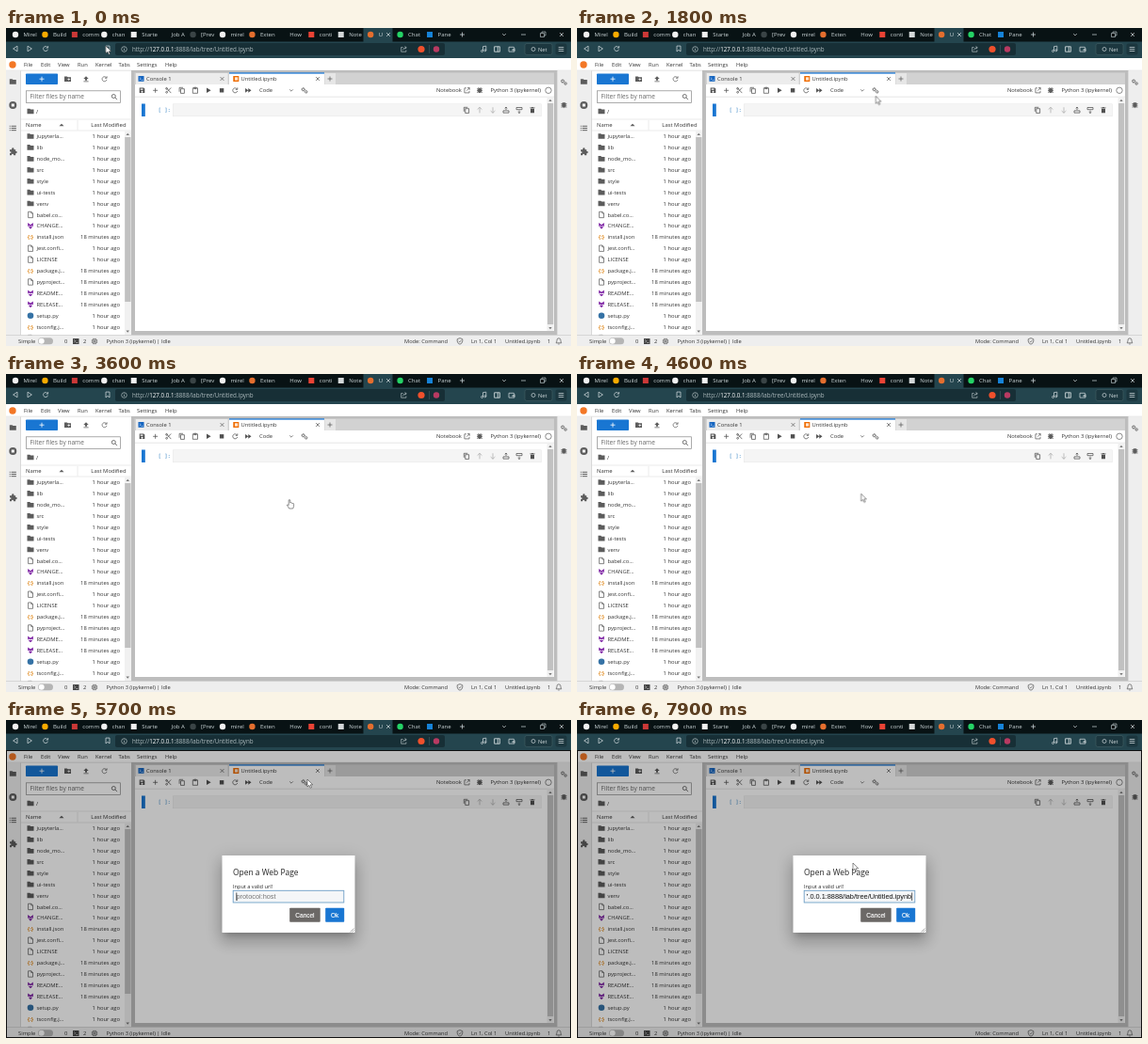
Write an HTML page that moves like this. It is 600x338 px and loops after 8 s.

```html
<!DOCTYPE html>
<html lang="en">
<head>
<meta charset="utf-8">
<title>Notebook workspace</title>
<style>
html, body { margin: 0; width: 100%; height: 100%; overflow: hidden; background: #fff; }
svg { display: block; width: 100vw; height: 100vh; }
text { font-family: "Open Sans", "Noto Sans", sans-serif; white-space: pre; }
text.field { font-family: "Liberation Sans", Arial, sans-serif; }
text.mono { font-family: "DejaVu Sans Mono", monospace; }

#pointer { animation: move 8s infinite; }
#arrow { animation: arrow 8s step-end infinite; }
#hand { animation: hand 8s step-end infinite; }
#hover { animation: hover 8s step-end infinite; }
#modal { animation: modal 8s step-end infinite; }
#empty { animation: empty 8s step-end infinite; }
#pasted { animation: pasted 8s step-end infinite; }
.caret { animation: blink 1s -.31s step-end infinite; }

@keyframes move {
  0%, 1.25% { transform: translate(106px, 19px); animation-timing-function: ease-in-out; }
  11.2%, 13% { transform: translate(289px, 76px); animation-timing-function: ease-in-out; }
  25%, 32.5% { transform: translate(320px, 72px); animation-timing-function: ease-in-out; }
  43%, 55% { transform: translate(300px, 133px); animation-timing-function: ease-in-out; }
  67.5%, 74% { transform: translate(320px, 63px); animation-timing-function: ease-in-out; }
  86%, 100% { transform: translate(293px, 152px); }
}
@keyframes arrow { 0% { opacity: 1; } 41.9% { opacity: 0; } 56% { opacity: 1; } }
@keyframes hand { 0% { opacity: 0; } 41.9% { opacity: 1; } 56% { opacity: 0; } }
@keyframes hover { 0% { opacity: 0; } 66% { opacity: 1; } 71.2% { opacity: 0; } }
@keyframes modal { 0% { opacity: 0; } 71.2% { opacity: 1; } }
@keyframes empty { 0% { opacity: 1; } 85% { opacity: 0; } }
@keyframes pasted { 0% { opacity: 0; } 85% { opacity: 1; } }
@keyframes blink { 0% { opacity: 1; } 50% { opacity: 0; } }
</style>
</head>
<body>
<svg viewBox="0 0 600 338" preserveAspectRatio="none">
  <defs>
    <clipPath id="fieldClip"><rect x="244" y="182" width="113.500" height="12"/></clipPath>
  </defs>
  <g id="browser"></g>
  <g id="page"></g>
  <g id="modal">
    <rect x=".5" y="32.500" width="599" height="305" fill="#000" fill-opacity=".26"/>
    <rect x=".5" y="32.500" width="599" height="305" fill="none" stroke="#101010"/>
    <g id="dialog"></g>
    <g id="empty">
      <text class="field" x="244.500" y="190.200" font-size="7.350" fill="#777">protocol:host</text>
      <path class="caret" d="M244.800 183.500V192" stroke="#111" stroke-width=".7"/>
    </g>
    <g id="pasted" clip-path="url(#fieldClip)">
      <text class="field" x="355.200" y="190.200" font-size="7.350" text-anchor="end" fill="#111">http://127.0.0.1:8888/lab/tree/Untitled.ipynb</text>
      <path class="caret" d="M355.700 183.500V192" stroke="#111" stroke-width=".7"/>
    </g>
    <path d="M365.500 225.500l4-4M367.500 225.500l2-2" stroke="#777" stroke-width=".6"/>
  </g>
  <g id="pointer">
    <path id="arrow" d="M0 0V8L1.900 6.300L3.200 9.200L4.500 8.600L3.200 5.800H5.700Z" fill="#fff" stroke="#333" stroke-width=".55"/>
    <path id="hand" d="M.2 1Q1-.2 1.800 1V4Q2.700 3.300 3.200 4.200Q4.100 3.600 4.500 4.500Q5.600 4.200 5.600 5.400V7.600Q5.200 9 4.700 10H.7Q-.3 8-1.700 6.400Q-1.300 5.300.2 6.500Z" fill="#fff" stroke="#333" stroke-width=".55"/>
  </g>
</svg>
<script>
const NS = 'http://www.w3.org/2000/svg';
const INK = '#333', GREY = '#5c5c5c', BLUE = '#1976d2';
let layer;

function add(tag, attrs) {
  const el = document.createElementNS(NS, tag);
  for (const key in attrs) el.setAttribute(key, attrs[key]);
  layer.append(el);
  return el;
}
const rect = (x, y, width, height, fill, more) => add('rect', { x, y, width, height, fill, ...more });
const dot = (cx, cy, r, fill, more) => add('circle', { cx, cy, r, fill, ...more });
// Text is placed by its vertical middle.
function label(x, mid, str, size = 5.8, fill = INK, more) {
  const el = add('text', { x, y: mid + size * .36, 'font-size': size, fill, ...more });
  el.textContent = str;
  return el;
}
const line = (d, stroke = GREY, width = .7) =>
  add('path', { d, fill: 'none', stroke, 'stroke-width': width });

// Icon shapes are centred on the origin: outline, 1 for solid, 2 for both.
const shapes = {
  folder: ['M-3.500-2.800H-.7L.2-1.900H3.500V2.800H-3.500Z', 1],
  newFolder: ['M-3.500-2.800H-.7L.2-1.900H3.500V2.800H-3.500ZM-.1.1V.7H1V1.800H1.600V.7H2.700V.1H1.600V-1H1V.1Z', 1],
  file: ['M-2.400-3.200H.8L2.500-1.500V3.200H-2.400ZM.8-3.200V-1.400H2.500'],
  markdown: ['M-2.800-3.300L0-1.200L2.800-3.300V.3H1.500V-.6L0 .6L-1.500-.6V.3H-2.800ZM-2.200 1H2.200L0 3.400Z', 1],
  upload: ['M0-3L2.700-.2H1V1.500H-1V-.2H-2.700ZM-2.600 2.200H2.600V3H-2.600Z', 1],
  refresh: ['M2.200-1.300A2.500 2.500 0 1 0 2.500.7M2.600-2.900V-.9H.6'],
  search: ['M1.300-.5A2 2 0 1 1-2.700-.5A2 2 0 1 1 1.300-.5M.8.9L3 3.100'],
  list: ['M-3.600-2.200h1M-1.700-2.200H3.600M-3.600 0h1M-1.700 0H3.600M-3.600 2.200h1M-1.700 2.200H3.600'],
  puzzle: ['M-3.300-2.200H-1.200Q-1.500-4.200 0-4.200T1.200-2.200H2.900V-.5Q4.500-.7 4.500.6T2.900 1.700V3.800H.9Q.8 2.200-.3 2.200T-1.500 3.800H-3.300V1.700Q-1.700 1.500-1.700.6T-3.300-.3Z', 1],
  save: ['M-2.800-2.800H1.700L2.800-1.700V2.800H-2.800ZM-1.800-1.900V-.6H1V-1.900ZM-1 1.400A1 1 0 1 0 1 1.400A1 1 0 1 0-1 1.400', 1],
  plus: ['M-2.500 0H2.500M0-2.500V2.500'],
  cut: ['M-2.500-2.800L2.600 2.800M2.500-2.800L-1.200 1.100M-1.200 2A.9.9 0 1 1-3 2A.9.9 0 1 1-1.200 2M-1.200-1.900A.9.9 0 1 1-3-1.900A.9.9 0 1 1-1.200-1.900'],
  copy: ['M-1.300-1.600H2.600V3.100H-1.300ZM-2.700 1.500V-3H1.300'],
  paste: ['M-2.600-2.500H2.600V3H-2.600ZM-1.200-3.100H1.200V-1.700H-1.200Z'],
  play: ['M-2-2.800L2.600 0L-2 2.800Z', 1],
  stop: ['M-2.200-2.200H2.200V2.200H-2.200Z', 1],
  forward: ['M-3.200-2.400L0 0L-3.200 2.400ZM0-2.400L3.200 0L0 2.400Z', 1],
  down: ['M-1.800-.9L0 .9L1.800-.9'],
  up: ['M0 3V-3M-2.400-.7L0-3L2.400-.7'],
  below: ['M0-3V3M-2.400.7L0 3L2.400.7'],
  close: ['M-1.900-1.900L1.900 1.900M1.900-1.900L-1.900 1.900'],
  link: ['M-.6-2.500H-2.600V2.600H2.500V.6M.5-2.700H2.700V-.5M2.700-2.700L-.4.4'],
  bug: ['M-1.600-1.500Q0-3.300 1.600-1.500V1.500Q0 3.700-1.600 1.500ZM-3-1.500h1.500M1.500-1.500H3M-3 .2H3M-3 2h1.500M1.500 2H3M-1.600-3L-.8-2M1.600-3L.8-2', 2],
  insertUp: ['M-3 .6H3V2.800H-3ZM0-.2V-3.200M-1.300-2L0-3.200L1.300-2'],
  insertDown: ['M-3-2.800H3V-.6H-3ZM0 .2V3.200M-1.300 2L0 3.200L1.300 2'],
  trash: ['M-2-1.500H2V3H-2ZM-2.600-2.700H-1L-.6-3.200H.6L1-2.700H2.600V-2H-2.600Z', 1],
  shield: ['M0-3.200L2.800-2.100V.2Q2.600 2.400 0 3.400Q-2.600 2.400-2.800.2V-2.100ZM-1.300 0L-.2 1.100L1.500-1'],
  bell: ['M-2.800 2H2.800L2-.1V-1.200Q1.800-3 0-3T-2-1.200V-.1ZM-.7 3.200H.7'],
  left: ['M2-2.800L-2.400 0L2 2.800Z'],
  right: ['M-2-2.800L2.400 0L-2 2.800Z'],
  bookmark: ['M-2-2.900H2V3L0 1.300L-2 3Z'],
  share: ['M-1-2H-2.800V2.700H2.400V1M-1 .9Q-.7-1.500 2.500-1.700M1-3L2.800-1.700L1-.3'],
  note: ['M-1 2V-2.800L2.300-3.300V1.300M-1 2A1 1 0 1 1-3 2A1 1 0 1 1-1 2M2.300 1.300A1 1 0 1 1 .3 1.300A1 1 0 1 1 2.300 1.300'],
  panel: ['M-2.900-2.700H2.900V2.700H-2.900ZM.8-2.700V2.700'],
  wallet: ['M-3-2.200H2.300V-1.200H3V2.600H-3ZM.9.2H3V1.300H.9Z'],
  menu: ['M-2.800-2H2.800M-2.800 0H2.800M-2.800 2H2.800'],
  chip: ['M-2-2H2V2H-2ZM-.7-.7H.7V.7H-.7ZM-1-3.200V-2M1-3.200V-2M-1 2V3.200M1 2V3.200M-3.200-1H-2M-3.200 1H-2M2-1H3.200M2 1H3.200']
};
function icon(name, x, y, color = GREY, width = .75) {
  const [d, solid] = shapes[name];
  add('path', {
    d, transform: `translate(${x} ${y})`, 'fill-rule': 'evenodd',
    fill: solid ? color : 'none', stroke: solid === 1 ? 'none' : color, 'stroke-width': width
  });
}
function gear(x, y, r, color = GREY) {
  dot(x, y, r, 'none', { stroke: color, 'stroke-width': r * .65 });
  dot(x, y, r * 1.45, 'none', {
    stroke: color, 'stroke-width': r * .4, 'stroke-dasharray': `${r * .57} ${r * .57}`
  });
}
function gears(x, y) {
  gear(x - 1.300, y - 1, 1.300);
  gear(x + 1.700, y + 1.500, 1.100);
}

function drawBrowser() {
  const pale = '#cfd9db', bar = '#24454e';
  rect(0, 0, 600, 15, '#081214');
  rect(0, 14.500, 600, 17.500, bar);
  rect(379.500, 0, 31, 15, bar);
  const tabs = [
    ['Mirel', '#f2f2f2'], ['Build', '#f9ab00'], ['comm', '#cb3837', 1], ['chan', '#f2f2f2'],
    ['Starte', '#f2f2f2', 1], ['Job A', ''], ['[Prev', '#3a4446'], ['mirel', '#f2f2f2'],
    ['Exten', '#e46e2e'], ['How', ''], ['conti', '#ea4335', 1], ['Note', '#d4d8d9', 1],
    ['U', '#e46e2e'], ['Chat', '#25d366'], ['Pane', '#1683d8', 1]
  ];
  tabs.forEach(([name, color, square], i) => {
    const x = 10 + i * 31.430;
    if (square) rect(x - 3, 4, 6, 6, color);
    else if (color) dot(x, 7, 3.200, color);
    label(x + 8.500, 7, name, 6, pale);
  });
  icon('close', 406, 7, pale);
  icon('plus', 484.500, 7, pale);
  icon('down', 529, 7, pale);
  line('M547 7H552', pale);
  line('M567.500 5.500H571.500V9.500H567.500ZM569 5.500V4H573V8H571.500', pale, .6);
  icon('close', 590, 7, pale);

  icon('left', 10, 22, pale);
  icon('right', 25, 22, pale);
  icon('refresh', 42, 22, pale);
  rect(116, 16, 350, 13, '#172f36', { rx: 2 });
  icon('bookmark', 108, 22, pale);
  dot(125.500, 22.500, 2.800, 'none', { stroke: pale, 'stroke-width': .6 });
  line('M125.500 22V24M125.500 20.700V21.400', pale, .6);
  label(134, 22.500, '', 6.220, '#aebbbe').innerHTML =
    'http://<tspan fill="#fff">127.0.0.1</tspan>:8888/lab/tree/Untitled.ipynb';
  icon('share', 422.500, 22.500, pale, .6);
  dot(441, 22.500, 3.600, '#f0502c');
  line('M449.500 18V27', '#48646b', .5);
  dot(457, 22.500, 3.200, '#b83a62');
  icon('note', 507.500, 22.500, pale);
  icon('panel', 521.500, 22.500, pale, .9);
  icon('wallet', 537, 22.500, pale);
  rect(551, 16.500, 29, 12, '#1c373f', { rx: 2, stroke: '#48646b', 'stroke-width': .5 });
  dot(560, 22.500, 2, 'none', { stroke: pale, 'stroke-width': .7 });
  label(565, 22.500, 'Net', 5.800, pale);
  rect(583.500, 16.500, 12, 12, '#1c373f', { rx: 2 });
  icon('menu', 589.500, 22.500, pale);
}

function drawFiles() {
  rect(21, 48.500, 34, 11.500, BLUE, { rx: .8 });
  icon('plus', 38, 54.200, '#fff', .8);
  icon('newFolder', 65.500, 54.200);
  icon('upload', 85, 54.200);
  icon('refresh', 104.500, 54.200);
  rect(21.400, 66.800, 100, 12.800, '#fff', { stroke: '#888', 'stroke-width': .7 });
  label(25.500, 73, 'Filter files by name', 6.550, '#666');
  icon('search', 115, 73, '#444');
  icon('folder', 26, 88.500);
  label(32, 88.500, '/');
  line('M16 97H133M16 109H133', '#ddd', .6);
  label(21, 103.200, 'Name', 5.900, INK, { 'font-weight': 500 });
  line('M76 98V108.500', '#ddd', .6);
  add('path', { d: 'M56.500 104.300L59 101.700L61.500 104.300Z', fill: GREY });
  label(127.500, 103.200, 'Last Modified', 5.900, INK, { 'font-weight': 500, 'text-anchor': 'end' });

  // The last row is almost wholly hidden by the status bar.
  const files = [
    'd jupyterla…', 'd lib', 'd node_mo…', 'd src', 'd style', 'd ui-tests', 'd venv',
    'f babel.co…', 'm CHANGE…', 'j install.json', 'f jest.confi…', 'f LICENSE', 'j package.j…',
    'f pyproject…', 'm README…', 'm RELEASE…', 'p setup.py', 'j tsconfig.j…', 'f yarn.lock'
  ];
  const recent = [9, 12, 13, 14, 15];
  files.forEach((entry, i) => {
    const kind = entry[0], y = 115 + i * 11.920;
    if (kind === 'd') icon('folder', 26, y);
    if (kind === 'f') icon('file', 26, y);
    if (kind === 'm') icon('markdown', 26, y, '#7b1fa2');
    if (kind === 'p') dot(26, y, 3.300, '#3572a5');
    if (kind === 'j') label(26, y - .3, '{:}', 6, '#e08a1e', { 'font-weight': 700, 'text-anchor': 'middle' });
    label(32.500, y, entry.slice(2));
    label(121, y, recent.includes(i) ? '18 minutes ago' : '1 hour ago', 5.850, INK, { 'text-anchor': 'end' });
  });
  rect(126, 109.500, 7, 217, '#f1f1f1');
  rect(126.200, 116, 6.300, 175, '#c1c1c1');
  add('path', { d: 'M127.500 114L129.200 111.800L131 114ZM127.500 321.500L129.200 323.700L131 321.500Z', fill: '#777' });
}

function drawNotebook() {
  rect(133, 45, 452.500, 281.500, '#bdbdbd');
  rect(136.500, 47.500, 445.500, 12.500, '#d2d2d2');
  rect(138, 48, 97.500, 12, '#ececec');
  rect(237, 48, 101, 12.500, '#fff');
  rect(237, 47.300, 101, 1.300, BLUE);
  rect(140.500, 51, 6, 5.800, '#1565c0');
  line('M141.800 52.500L143.200 53.800L141.800 55.200M143.700 55.300H145.500', '#fff', .5);
  label(149, 54, 'Console 1');
  icon('close', 229.500, 54);
  rect(241.300, 51, 6, 6, '#ef6c00');
  rect(243, 52.300, 3.200, 3.300, '#ffe4cf');
  label(249.500, 54, 'Untitled.ipynb');
  icon('close', 331, 54);
  rect(338.500, 48, 11.500, 12, '#e6e6e6');
  icon('plus', 344, 54);

  rect(137, 60, 445, 262, '#fff');
  ['save', 'plus', 'cut', 'copy', 'paste', 'play', 'stop', 'refresh', 'forward']
    .forEach((name, i) => icon(name, 144.500 + i * 14.100, 66.300, '#505050'));
  label(269, 66.300, 'Code');
  icon('down', 303, 66.300);
  rect(311, 60.500, 12.500, 12, '#dedede', { id: 'hover' });
  gears(317, 66.300);
  label(457, 66.300, 'Notebook');
  icon('link', 489.500, 66.300);
  icon('bug', 503, 66.300);
  label(514.500, 66.300, 'Python 3 (ipykernel)');
  dot(576, 66.300, 3.200, 'none', { stroke: GREY, 'stroke-width': .7 });
  line('M137 73.200H582', '#d5d5d5', .6);

  rect(144, 80.500, 3.800, 13.500, BLUE);
  label(161.500, 87.300, '[ ]:', 5.600, '#307fc1', { class: 'mono' });
  rect(177.300, 80.800, 391, 13, '#f5f5f5', { stroke: '#e4e4e4', 'stroke-width': .5 });
  ['copy', 'up', 'below', 'insertUp', 'insertDown', 'trash'].forEach((name, i) =>
    icon(name, 489 + i * 14, 87.300, i === 1 || i === 2 ? '#aaa' : '#505050'));
  rect(574.500, 73.500, 7, 248.500, '#f1f1f1');
  rect(575, 80, 6.200, 235, '#c1c1c1');
  add('path', { d: 'M576.300 78L578 75.800L579.700 78ZM576.300 318L578 320.200L579.700 318Z', fill: '#777' });
}

function drawStatus() {
  rect(0, 326.500, 600, 11.500, '#eee');
  line('M0 326.500H600', '#c4c4c4', .6);
  label(13, 333, 'Simple');
  rect(34, 329.300, 16, 7, '#b5b5b5', { rx: 3.500 });
  dot(37.700, 332.800, 3, '#fff');
  label(62, 333, '0');
  rect(71, 330, 6.500, 6, '#444');
  line('M72.300 331.300L73.700 332.800L72.300 334.300M74.300 334.500H76.300', '#fff', .5);
  label(82, 333, '2');
  icon('chip', 94, 333);
  label(106.500, 333, 'Python 3 (ipykernel) | Idle', 5.680);
  label(423, 333, 'Mode: Command', 5.700);
  icon('shield', 482, 332.800);
  label(494, 333, 'Ln 1, Col 1', 5.700);
  label(530, 333, 'Untitled.ipynb', 5.700);
  label(575, 333, '1');
  icon('bell', 587, 332.800);
}

function drawPage() {
  rect(0, 32, 600, 306, '#fff');
  dot(7, 39, 3.700, '#f37726');
  const menus = { File: 19, Edit: 37, View: 55, Run: 76, Kernel: 95, Tabs: 119.500, Settings: 139, Help: 169 };
  for (const name in menus) label(menus[name], 39.200, name, 5.800);
  line('M0 45.200H600', '#d0d0d0', .6);
  rect(0, 45.500, 15.500, 281, '#eee');
  rect(585.500, 45.500, 14.500, 281, '#eee');
  line('M15.500 45.500V326.500', '#c4c4c4', .6);
  icon('folder', 7.300, 57);
  dot(7.300, 82, 4, GREY);
  rect(5.800, 80.500, 3, 3, '#fff');
  icon('list', 7.300, 106.500, GREY, 1);
  icon('puzzle', 7.300, 131.500);
  gears(592.500, 57.500);
  icon('bug', 592.500, 82);
  drawFiles();
  drawNotebook();
  drawStatus();
}

function drawDialog() {
  const x = 229.500, y = 144, w = 141, h = 82;
  const shade = (drop, blur, spread, opacity) =>
    rect(x - spread, y + drop - spread, w + 2 * spread, h + 2 * spread, '#000',
      { opacity, style: `filter: blur(${blur}px)` });
  shade(5, 3.200, -3, .2);
  shade(10, 7.600, 1.500, .14);
  shade(4, 9.300, 3.500, .12);
  rect(x, y, w, h, '#fff');
  label(241, 161.500, 'Open a Web Page', 8.450, '#222');
  label(241, 177, 'Input a valid url!', 5.600, '#222');
  rect(241.200, 181.300, 117.600, 12.700, '#f4f6f8', { stroke: '#6d9fc6', 'stroke-width': .9 });
  const button = (left, width, name, fill) => {
    rect(left, 199.800, width, 15, fill, { rx: .8 });
    label(left + width / 2, 207.300, name, 6.500, '#fff',
      { class: 'field', 'text-anchor': 'middle', stroke: '#fff', 'stroke-width': .15 });
  };
  button(301.200, 32.500, 'Cancel', '#6b6866');
  button(339.200, 20, 'Ok', BLUE);
}

for (const [id, draw] of [['browser', drawBrowser], ['page', drawPage], ['dialog', drawDialog]]) {
  layer = document.getElementById(id);
  draw();
}
</script>
</body>
</html>
```
